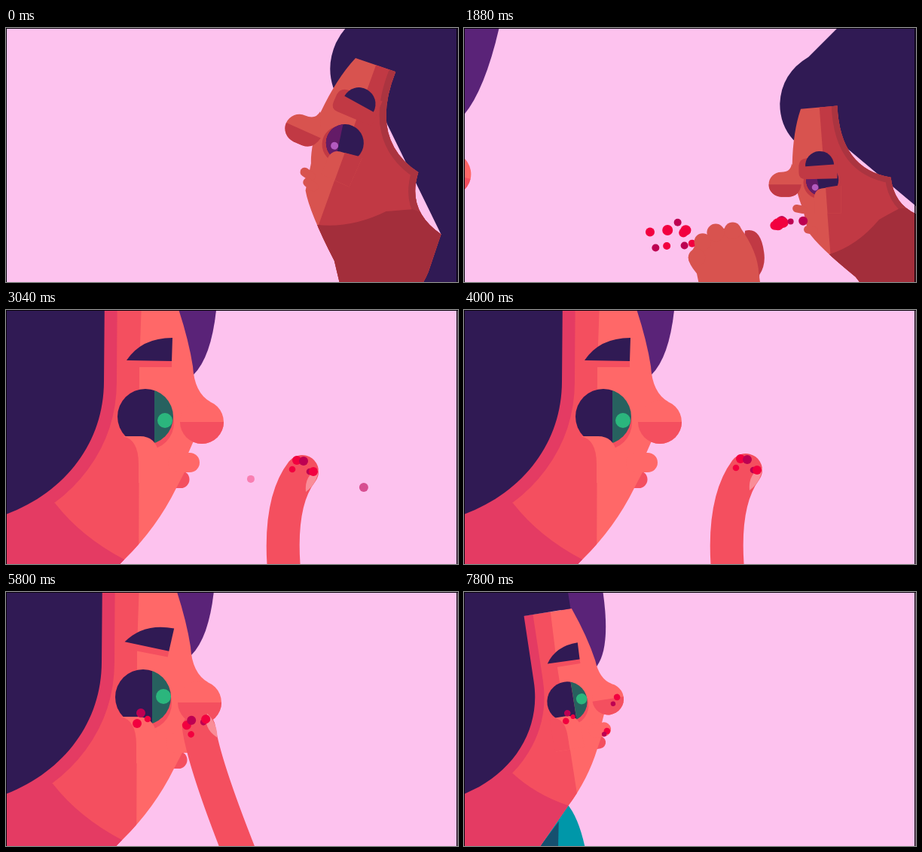
An HTML page with a canvas for the animation above (7.84 s loop, 600 by 338 pixels).

```html
<!DOCTYPE html>
<html lang="en">
<head>
<meta charset="utf-8">
<title>Freckles</title>
<style>
  html, body { margin: 0; height: 100%; overflow: hidden; background: #fdc2ee; }
  canvas { display: block; width: 100vw; height: 100vh; }
</style>
</head>
<body>
<canvas id="stage" width="600" height="338"></canvas>
<script>
const ctx = document.getElementById('stage').getContext('2d');
const LOOP = 7840;
const PINK = '#fdc2ee', HAIR = '#301a54', RED = '#f2003f', PLUM = '#bd0052';
const A = { light: '#d8534f', mid: '#c13944', dark: '#a32e3b', edge: '#ab3440' };
const B = { light: '#ff6868', mid: '#f44f5f', dark: '#e43b63' };
const rad = d => d * Math.PI / 180;
const lerp = (a, b, k) => a + (b - a) * k;
const clamp = x => Math.max(0, Math.min(1, x));
const ease = x => x * x * (3 - 2 * x);

// Rows are [time, ...values]; eased between neighbours.
function at(t, rows) {
  if (t <= rows[0][0]) return rows[0].slice(1);
  for (let i = 1; i < rows.length; i++) {
    const p = rows[i - 1], q = rows[i];
    if (t < q[0]) {
      const k = ease((t - p[0]) / (q[0] - p[0]));
      return p.slice(1).map((v, j) => lerp(v, q[j + 1], k));
    }
  }
  return rows[rows.length - 1].slice(1);
}

function fill(d, color) {
  ctx.fillStyle = color;
  ctx.fill(new Path2D(d));
}
function disc(x, y, r, color) {
  ctx.fillStyle = color;
  ctx.beginPath();
  ctx.arc(x, y, r, 0, 7);
  ctx.fill();
}
function stroke(d, width, color) {
  ctx.lineWidth = width;
  ctx.lineCap = 'round';
  ctx.strokeStyle = color;
  ctx.stroke(new Path2D(d));
}
function group(draw) {
  ctx.save();
  draw();
  ctx.restore();
}
function clipTo(d, draw) {
  group(() => { ctx.clip(new Path2D(d)); draw(); });
}
// Put the point (ox, oy) at (x, y), turned and scaled.
function place(x, y, deg, s, ox, oy) {
  ctx.translate(x, y);
  ctx.rotate(rad(deg));
  ctx.scale(s, s);
  ctx.translate(-ox, -oy);
}
const circlePath = (x, y, r) => `M${x - r} ${y}a${r} ${r} 0 1 1 ${2 * r} 0a${r} ${r} 0 1 1 ${-2 * r} 0Z`;

/* Blowing woman */
const poseA = t => at(t, [
  [0, 464, 40, 24, 1], [150, 464, 40, 24, 1], [1200, 368, 80, 0, 1], [1640, 368, 80, 0, 1],
  [2280, 616, 167, 0, .58], [2560, 740, 180, 0, .5]
]);
const A_EDGE = 'M424 75Q428 172 506 185Q512 238 567 248';
const A_FACE = 'M368 80L424 75Q428 172 506 185Q512 238 567 248L572 300Q573 325 564 338L530 440L452 338Q395 292 379 268L371 232Q366 222 362 205L350 185L355 165Q356 115 368 80Z';

function drawA(t) {
  const [x, y, deg, s] = poseA(t);
  const [frown, mouth] = at(t, [[0, 0, 0], [800, 0, 0], [1200, 1, 1], [1700, 1, 1], [2200, .4, .4]]);
  group(() => {
    place(x, y, deg, s, 368, 80);
    fill('M357 128Q336 105 336 72Q338 25 380 0L440 -60H1100V700H540L566 338L567 248L424 128Z', HAIR);
    fill(A_FACE, A.light);
    clipTo(A_FACE, () => {
      fill('M396 70L413.500 303L420 340L700 500V60Z', A.mid);
      stroke(A_EDGE, 18, A.edge);
      fill('M410 304Q455 290 488 250Q500 243 519 233L600 228V500H400Z', A.dark);
    });

    disc(397, 193, 25, A.mid);
    clipTo(circlePath(401, 189, 25), () => {
      fill('M360 150H450V230H360Z', HAIR);
      fill('M360 150H385L397 206V230H360Z', '#641b67');
      disc(390, lerp(198, 201, frown), 5, '#b35abf');
    });
    fill('M389 223Q386 205 400 202L430 198V240H389Z', A.light);
    fill('M406.200 200.800L430 197V240H409Z', A.mid);

    group(() => {
      ctx.translate(0, -40 * (1 - frown));
      fill('M365 174Q366 164 376 163L424 158V194L375 195Q365 195 365 185Z', A.mid);
      ctx.translate(397, 174);
      ctx.rotate(rad(lerp(5, -6, frown)));
      fill('M-22 0A22 22 0 0 1 22 0Z', HAIR);
    });

    fill('M354 164Q353 177 338 177A19 19 0 0 0 338 215H350Q366 214 369 196Z', A.light);
    fill('M319 196A19 19 0 0 0 338 215H350Q366 214 369 196Z', A.mid);
    const lip = (px, py) => stroke(`M${px} ${py}l10 2`, 12, A.light);
    lip(lerp(368, 360, mouth), lerp(246, 230, mouth));
    lip(lerp(377, 379, mouth), lerp(257, 267, mouth));
  });
}

function drawHand(t) {
  const [x, y, s] = at(t, [
    [250, -40, 130, 1], [800, 0, 0, 1], [1640, 0, 0, 1], [2280, 437, 107, .58], [2560, 620, 130, .5]
  ]);
  group(() => {
    place(x, y, 0, s, 0, 0);
    fill('M270 272Q294 266 299 305Q302 325 292 340L290 420H250Z', A.mid);
    fill('M183 313L195 292L205 283L224 270L262 266Q290 305 291 338L305 430H215L196 338Q183 322 183 313Z', A.light);
    for (const [fx, fy, r] of [[251, 272, 13], [225, 275, 13.5], [205, 289, 13], [196, 313, 13]])
      disc(fx, fy, r, A.light);
  });
}

/* Flying dots: first cluster [x1, y1, x2, y2, r, plum, end alpha] */
const FIRST = [
  [322, 283, 292, 264, 6, 0, 0], [332, 287, 324, 257, 7, 0, 0], [325, 278, 351, 246, 5, 1, 0],
  [343, 292, 357, 254, 7, 0, 0], [347, 287, 349, 263, 6, 0, 0], [328, 307, 364, 278, 5, 1, 0],
  [352, 268, 365, 299, 5, 0, .35], [346, 290, 313, 290, 5, 0, 0], [330, 284, 299, 298, 5, 1, 0]
];
const SECOND = [
  [472, 259, 5, 1], [478, 263, 7, 1], [492, 268, 7, 0], [488, 276, 8, 0], [487, 284, 6, 0],
  [510, 267, 5, 0], [511, 273, 5, 0], [507, 276, 4, 1], [550, 268, 6, 1, .6]
];
function flyer(x, y, r, plum, last, t) {
  ctx.globalAlpha = lerp(1, last, clamp((t - 2650) / 380)) * clamp((3240 - t) / 200);
  disc(x, y, r, plum ? PLUM : RED);
  ctx.globalAlpha = 1;
}
function mouthAt(t) {
  const [x, y, , s] = poseA(t);
  return [x + 4 * s, y + 172 * s];
}
function drawFlyers(t) {
  if (t > 3240) return;
  const drift = (t - 2280) / 760;
  FIRST.forEach(([x1, y1, x2, y2, r, plum, last], i) => {
    const born = 1090 + i * 10;
    if (t < born) return;
    let x, y;
    if (t < 1280) {
      const k = (t - born) / (1280 - born);
      x = lerp(370, x1, k); y = lerp(250, y1, k);
    } else if (t < 2280) {
      const k = (t - 1280) / 1000;
      x = lerp(x1, x2, k) - 60 * Math.sin(k * Math.PI); y = lerp(y1, y2, k);
    } else {
      x = x2 - 40 * drift; y = y2 - 74 * drift;
    }
    flyer(x, y, r, plum, last, t);
  });
  SECOND.forEach(([x2, y2, r, plum, last = 0], i) => {
    const born = 1480 + i * 50;
    if (t < born) return;
    const [mx, my] = mouthAt(born);
    const k = (t - born) / (2280 - born);
    const x = k < 1 ? lerp(mx, x2, k) : x2 - 75 * drift;
    const y = k < 1 ? lerp(my, y2, k) : y2 - 32 * drift;
    flyer(x, y, r, plum, last, t);
  });
}

/* Freckled woman */
const poseB = t => at(t, [
  [1700, -180, 175, 14, 1], [2240, 159, 160, 9, 1], [2320, 159, 160, 9, 1], [3000, 185, 142, 0, 1],
  [4150, 185, 142, 0, 1], [4700, 187, 134, -5, 1], [5200, 187, 134, -5, 1], [5750, 182, 140, 0, 1],
  [6800, 182, 140, 0, 1], [7600, 137, 146, -9, .72]
]);
const B_EDGE = 'M131 -60L130 95C130 175 80 242 0 272L-40 284L-300 340';
const B_FACE = 'M100 -27H220Q241 30 248 75Q250 110 271 122L250 172L240 195L238 214L226 237Q200 290 157 332L94 398L-300 800V-27Z';
// [time shown, x, y, r, plum]
const FRECKLES = [
  [5080, 182, 163, 6, 1], [5080, 177, 177, 6, 0], [5080, 191, 171, 4.3, 0],
  [5900, 277, 148, 6, 0], [5900, 268, 159, 4.500, 1],
  [6500, 249, 207, 6, 0], [6500, 243, 212, 4.500, 1]
];

function drawB(t) {
  const [x, y, deg, s] = poseB(t);
  const [bx, by, brot] = at(t, [
    [4150, 0, 0, 0], [4700, -9, 28, -6], [5200, -9, 28, -6], [5700, 0, 7, 11],
    [6700, 0, 7, 11], [7200, 0, 0, 0]
  ]);
  const [gx, gy] = at(t, [
    [2280, 202, 141], [2800, 211, 147], [4150, 211, 147], [4700, 196, 148],
    [5200, 196, 148], [5700, 212, 141]
  ]);
  group(() => {
    place(x, y, deg, s, 185, 142);
    fill('M200 -120H280Q290 45 249 86L200 60Z', '#5a2378');
    if (t > 6750) {
      fill('M155 328Q176 362 176 440H50L94 398Z', '#0097a9');
      fill('M90 402L135 358L120 440H60Z', '#16506f');
    }
    stroke('M215 225.500H232', 23, B.mid);
    fill(B_FACE, B.light);
    clipTo(B_FACE, () => {
      fill('M-300 -40H181L177 75L176 400H-300Z', B.mid);
      stroke(B_EDGE, 34, B.dark);
      fill('M-300 257H65Q100 302 157 332L220 500L-300 900Z', B.dark);
    });
    fill('M-400 -400H218V-27H131L130 95C130 175 80 242 0 272L-40 284L-400 360Z', HAIR);
    stroke('M228 203H244', 26, B.light);

    disc(187, 150, 36, B.mid);
    clipTo(circlePath(185, 142, 37), () => {
      fill('M140 100H197V190H140Z', HAIR);
      fill('M197 100H230V190H197Z', '#27615f');
    });
    disc(gx, gy, 10, '#2bb67d');
    fill('M150 168H178Q198 168 203 190V230H150Z', B.light);
    fill('M148 168H155Q176 172 176 205V230H148Z', B.mid);

    group(() => {
      place(190 + bx, 67 + by, brot, 1, 190, 67);
      fill('M165 64H220V76H165Z', B.mid);
      fill('M160 67Q180 37 221 37L220 68Z', HAIR);
    });

    disc(260, 149, 29, B.light);
    fill('M231 149H289A29 29 0 0 1 231 149Z', B.mid);
    for (const [from, fx, fy, r, plum] of FRECKLES)
      if (t >= from) disc(fx, fy, r, plum ? PLUM : RED);
  });
}

/* Finger: base, bend, tip, tip angle */
function drawFinger(t) {
  if (t < 2500 || t > 7300) return;
  const [x0, y0, cx, cy, x1, y1, deg] = at(t, [
    [2500, 369, 560, 362, 470, 393, 460, 0],
    [2960, 369, 345, 362, 255, 393, 215, 0],
    [3060, 369, 345, 362, 255, 393, 215, 0],
    [3400, 350, 345, 343, 255, 374, 213, 0],
    [4100, 350, 345, 343, 255, 374, 213, 0],
    [4760, 200, 345, 190, 255, 227, 191, -17],
    [5050, 195, 345, 178, 250, 187, 179, -20],
    [5250, 195, 345, 178, 250, 187, 179, -20],
    [5760, 309, 345, 263, 228, 256, 181, -52],
    [5960, 309, 345, 263, 228, 256, 181, -52],
    [6450, 302, 345, 258, 265, 239, 210, -45],
    [6700, 302, 345, 258, 265, 239, 210, -45],
    [7300, 390, 560, 375, 480, 360, 440, -30]
  ]);
  stroke(`M${x0} ${y0}Q${cx} ${cy} ${x1} ${y1}`, 44, B.mid);
  group(() => {
    ctx.translate(x1, y1);
    ctx.rotate(rad(deg));
    fill('M22 -3Q3 4 5 27Q20 16 22 -3Z', '#f98d98');
    if (t < 2880) return;
    for (const [x, y, r, plum] of [[-7, -15, 6, 0], [2, -14, 6, 1], [-13, -3, 4.300, 0], [10, 0, 4.300, 1], [15, 0, 6, 0]])
      disc(x, y, r, plum ? PLUM : RED);
  });
}

function frame(now) {
  const t = now % LOOP;
  ctx.fillStyle = PINK;
  ctx.fillRect(0, 0, 600, 338);
  if (t < 2560) drawA(t);
  drawFlyers(t);
  if (t > 250 && t < 2560) drawHand(t);
  if (t > 1700) drawB(t);
  drawFinger(t);
  ctx.fillStyle = '#08040c';
  ctx.fillRect(0, 0, 600, 1);
  ctx.fillRect(0, 0, 1, 338);
  ctx.fillRect(598, 0, 1.500, 338);
}

const start = performance.now();
function tick() {
  frame(performance.now() - start);
  requestAnimationFrame(tick);
}
tick();
</script>
</body>
</html>
```
